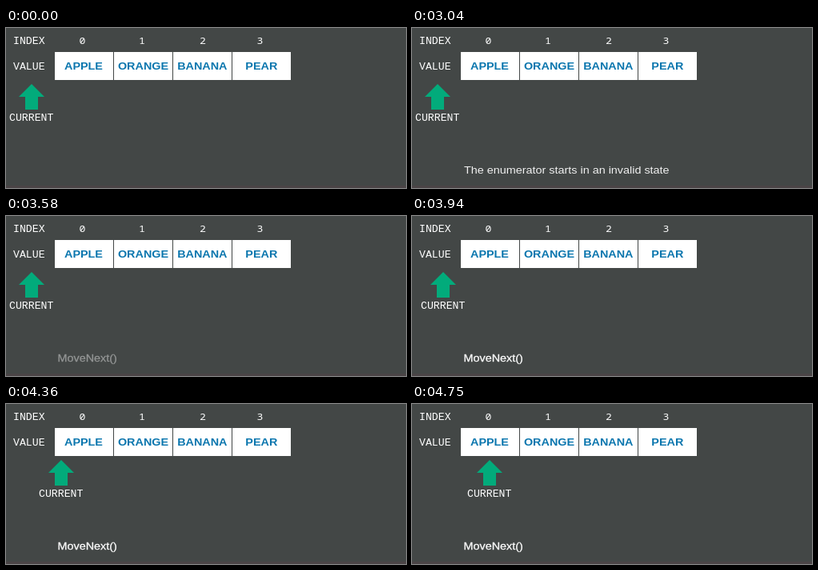
These frames come from a looping animation (500 px wide and 200 px high, 8 s). An HTML page:

```html
<!DOCTYPE html>
<html lang="en">
<head>
<meta charset="utf-8">
<title>Enumerator</title>
<style>
  html, body { margin: 0; width: 100%; height: 100%; overflow: hidden; background: #434746; }
  svg { position: absolute; top: 0; left: 0; display: block; }

  /* Slightly flattened lettering; each group's origin is its baseline */
  text { font: 14.4px "Liberation Sans", Arial, sans-serif; fill: #fff; transform: scaleY(.88); }
  .mono text { font: 13.2px "Liberation Mono", "Courier New", monospace; transform: scaleY(.92); }
  .mono .digit { font-family: "Noto Sans Mono", monospace; text-anchor: middle; transform: scaleY(.86); }
  .cells rect { fill: #fff; }
  .cells text { font-weight: bold; fill: #0a76ae; text-anchor: middle; }
  .pointer { animation: slide 8s infinite; }
  .intro { animation: intro 8s infinite; }
  .call { stroke: #fff; stroke-width: .3px; animation: call 8s infinite; }

  /* 30 ms ticks */
  @keyframes slide {
    0% { left: 0; }
    48.125% { left: 0; animation-timing-function: steps(30, end); }
    59.375%, 100% { left: 65px; }
  }
  @keyframes intro {
    0% { opacity: 0; animation-timing-function: steps(14, end); }
    5.25% { opacity: 1; }
    37.625% { opacity: 1; animation-timing-function: steps(13, end); }
    42.5%, 100% { opacity: 0; }
  }
  @keyframes call {
    0% { opacity: 0; }
    42.5% { opacity: 0; animation-timing-function: steps(14, end); }
    47.75%, 100% { opacity: 1; }
  }
</style>
</head>
<body>
<svg width="500" height="200">
  <rect y="197" width="500" height="3" fill="#4a4446"/>
  <g class="mono" transform="translate(0 20)">
    <text x="9">INDEX</text>
    <text class="digit" x="95.5">0</text>
    <text class="digit" x="170">1</text>
    <text class="digit" x="246">2</text>
    <text class="digit" x="317.5">3</text>
  </g>
  <g class="mono" transform="translate(0 52)">
    <text x="9">VALUE</text>
  </g>
  <g class="cells" transform="translate(0 52)">
    <rect x="61" y="-22" width="73" height="35"/>
    <rect x="135" y="-22" width="73" height="35"/>
    <rect x="209" y="-22" width="73" height="35"/>
    <rect x="283" y="-22" width="73" height="35"/>
    <text x="97">APPLE</text>
    <text x="171.5">ORANGE</text>
    <text x="245.3">BANANA</text>
    <text x="319.3">PEAR</text>
  </g>
  <g transform="translate(0 182)">
    <text class="intro" x="65">The enumerator starts in an invalid state</text>
    <text class="call" x="64.5">MoveNext()</text>
  </g>
</svg>
<svg class="pointer mono" width="130" height="200">
  <path d="M32 70 L48 86 H40 V102 H24 V86 H16 Z" fill="#02ab7b"/>
  <g transform="translate(0 116)">
    <text x="4">CURRENT</text>
  </g>
</svg>
</body>
</html>
```
